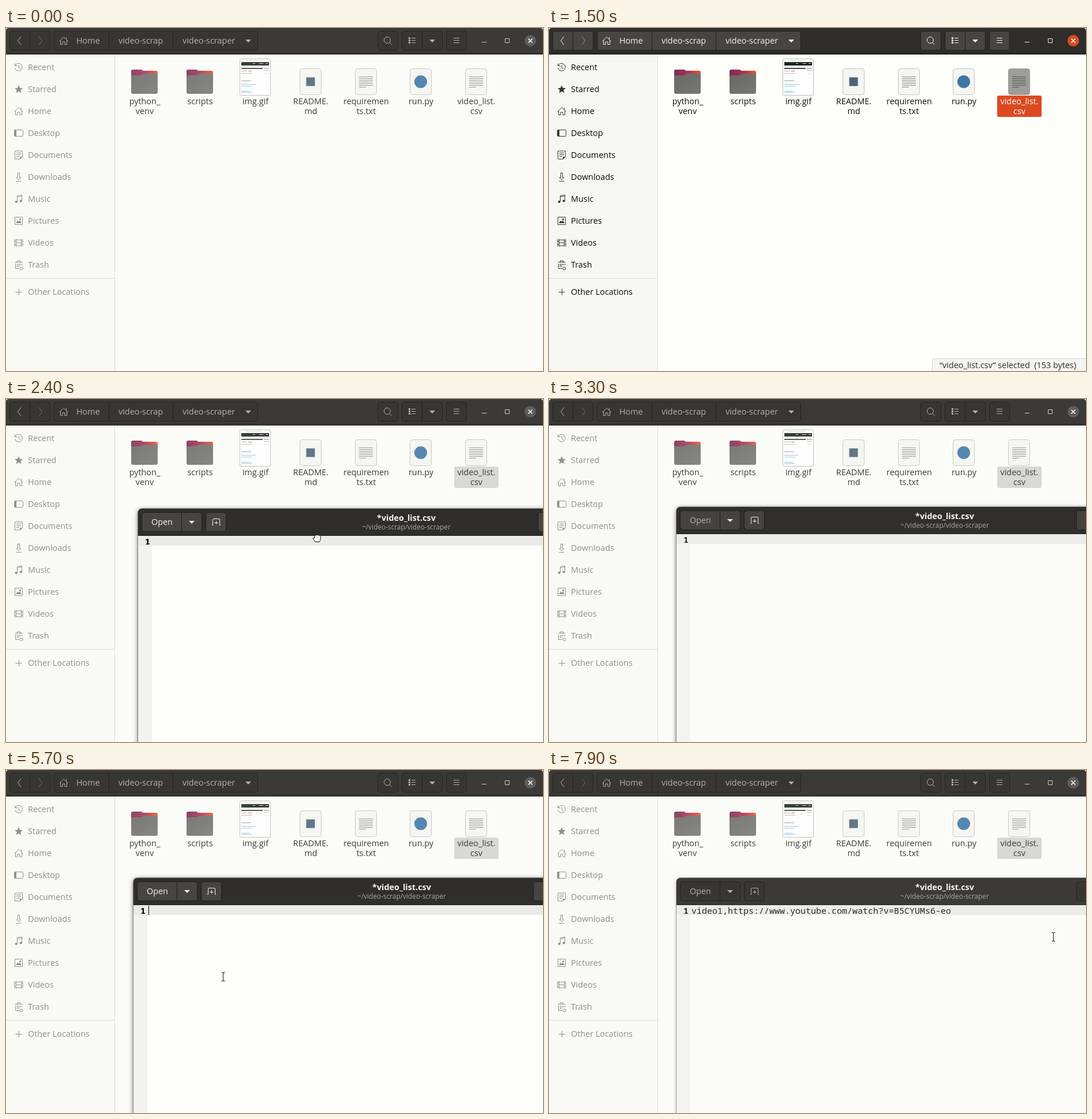
An HTML page for the animation above (8 s loop, 931 by 594 pixels).

```html
<!DOCTYPE html>
<html lang="en">
<head>
<meta charset="utf-8">
<title>Editing a video list</title>
<style>
html, body { margin: 0; width: 100%; height: 100%; overflow: hidden; background: #fbfcf8; }
svg { display: block; position: absolute; left: 0; top: 0; font: 14.4px "Open Sans", "Noto Sans", sans-serif; }

.off { --head: #3c3a37; --edge: #38302f; --btn: #383633; --rim: #252421; --fg: #b4b2ad; --ctl: #cfcdc8; --close: #5f5d59;
  --side: #f9faf5; --bg: #fbfcf8; --text: #8d8f8b; --icon: #8f918d; --label: #3a3c39; --sel: #d8d9d5; --selText: #3a3c39;
  --gutter: #f3f4ef; --line: #ebece7; --num: #2b2d2b; }
.on { --head: #2f2e2b; --edge: #292825; --btn: #464541; --rim: #1f1e1c; --fg: #f4f3ef; --ctl: #f4f3ef; --close: #dd4a22;
  --side: #f6f7f2; --bg: #fefffb; --text: #0c0d0b; --icon: #353633; --label: #0c0d0b; --sel: #dc4a21; --selText: #fff;
  --gutter: #f2f3ee; --line: #eaebe6; --num: #000; }

.btn { fill: var(--btn); stroke: var(--rim); }
.rim { stroke: var(--rim); }
.fg { fill: var(--fg); }
.ln { fill: none; stroke: var(--fg); }
.ctl { fill: none; stroke: var(--ctl); }
.ic { fill: none; stroke: var(--icon); }
.ics { fill: var(--icon); }
.side { fill: var(--text); }
.label { fill: var(--label); text-anchor: middle; }
.picked { fill: var(--selText); }
.mid { text-anchor: middle; }
.mono { font-family: "Noto Sans Mono", "DejaVu Sans Mono", monospace; font-size: 15px; }
.bold { font-weight: 700; }

.anim { animation: 8s step-end infinite; }
#files .on { animation-name: filesFocus; }
#files .off .pick { animation-name: pick; }
#status { animation-name: status; }
#editor { animation-name: drag; }
.soft { filter: drop-shadow(0 1px 3px rgba(0,0,0,.25)); }
.deep { filter: drop-shadow(0 2px 5px rgba(0,0,0,.4)); }
.head.on, #shadow { animation-name: headFocus; }
.body.on { animation-name: bodyFocus; }
#open { animation-name: openFocus; }
#caret { animation-name: caret; }
#typed { animation-name: typed; }
#arrow { animation-name: arrow; }
#hand { animation-name: hand; }
#beam { animation-name: beam; }

@keyframes filesFocus { 0% { opacity: 0 } 16.25% { opacity: .45 } 17.5% { opacity: .85 } 18.75% { opacity: 1 }
  26.25% { opacity: .45 } 27.5% { opacity: .06 } 28.75%, 100% { opacity: 0 } }
@keyframes pick { 0% { opacity: 0 } 16.25%, 100% { opacity: 1 } }
@keyframes status { 0% { opacity: 0 } 17.5% { opacity: 1 } 26.25%, 100% { opacity: 0 } }
@keyframes drag { 0% { transform: translate(1200px, 0) } 26.25% { transform: translate(424px, 241px) }
  27.5% { transform: translate(384px, 231px) } 28.75% { transform: translate(300px, 209px) }
  30% { transform: translate(229px, 190px) } 31.25%, 100% { transform: translate(221px, 187px) } }
@keyframes headFocus { 0% { opacity: 1 } 41.25% { opacity: .9 } 42.5% { opacity: .45 } 43.75% { opacity: .1 } 45% { opacity: 0 }
  66.25% { opacity: .45 } 67.5% { opacity: .9 } 68.75% { opacity: 1 }
  82.5% { opacity: .96 } 83.75% { opacity: .45 } 85% { opacity: .1 } 86.25%, 100% { opacity: 0 } }
@keyframes bodyFocus { 0% { opacity: 1 } 41.25% { opacity: 0 } 66.25% { opacity: 1 } 82.5%, 100% { opacity: 0 } }
@keyframes openFocus { 0% { fill: #f4f3ef } 41.25% { fill: #b4b2ad } 66.25% { fill: #f4f3ef } 82.5%, 100% { fill: #b4b2ad } }
@keyframes caret { 0% { opacity: 1 } 28.75% { opacity: 0 } 36.25%, 100% { opacity: 1 } }
@keyframes typed { 0% { opacity: 0 } 82.5%, 100% { opacity: 1 } }
@keyframes arrow { 0% { transform: translate(-99px, -99px) } 8.75% { transform: translate(852px, 136px) }
  10% { transform: translate(834px, 124px) } 12.5% { transform: translate(830px, 117px) }
  13.75% { transform: translate(826px, 111px) } 18.75%, 100% { transform: translate(-99px, -99px) } }
@keyframes hand { 0% { transform: translate(-99px, -99px) } 26.25% { transform: translate(739px, 269px) }
  27.5% { transform: translate(699px, 259px) } 28.75% { transform: translate(612px, 249px) }
  30% { transform: translate(539px, 241px) } 31.25% { transform: translate(532px, 218px) }
  35%, 100% { transform: translate(-99px, -99px) } }
@keyframes beam { 0% { transform: translate(-99px, -99px) } 35% { transform: translate(533px, 244px) }
  36.25% { transform: translate(534px, 251px) } 37.5% { transform: translate(534px, 254px) }
  41.25% { transform: translate(-99px, -99px) }
  63.75% { transform: translate(352px, 401px) } 65% { transform: translate(355px, 396px) }
  66.25% { transform: translate(359px, 389px) } 67.5% { transform: translate(364px, 380px) }
  68.75% { transform: translate(369px, 370px) } 70% { transform: translate(374px, 362px) }
  71.25% { transform: translate(376px, 358px) } 73.75% { transform: translate(362px, 389px) }
  76.25% { transform: translate(-99px, -99px) }
  95% { transform: translate(334px, 454px) } 96.25% { transform: translate(510px, 399px) }
  97.5% { transform: translate(740px, 324px) } 98.75%, 100% { transform: translate(874px, 289px) } }
</style>
</head>
<body>
<svg width="931" height="594" viewBox="0 0 931 594">
  <defs>
    <linearGradient id="tab"><stop offset="0" stop-color="#7d2a55"/><stop offset=".5" stop-color="#a33450"/><stop offset="1" stop-color="#e4572f"/></linearGradient>
    <linearGradient id="front" x2="1" y2="1"><stop offset="0" stop-color="#686966"/><stop offset="1" stop-color="#777875"/></linearGradient>
  </defs>
  <g id="files"></g>
  <g id="status" class="anim">
    <path d="M664.5 595V576q0-3.500 3.500-3.500H932V595z" fill="#f4f5f0" stroke="#d2d3ce"/>
    <text x="677" y="588.500" fill="#2d2e2c">“video_list.csv” selected&nbsp; (153 bytes)</text>
  </g>
  <g id="editor" class="anim"></g>
  <path id="arrow" class="anim" d="M.5.5V16L4.300 12.600 6.800 18.300 9.300 17.200 6.900 11.600H12z" fill="#111" stroke="#fff"/>
  <path id="hand" class="anim" d="M-4-3.500q.5-2.500 2.500-1.200 1-1.800 2.800-.4 1.600-1 2.600.6 2.200-.6 2.400 1.600V1Q6 4 4.500 6.500H-3Q-4 4-6.800 1.300-7.500-.6-5-.6L-4 0z" fill="#fff" stroke="#111"/>
  <g id="beam" class="anim" fill="none">
    <path d="M-3.500-8H-1Q.5-8 .5-6.500V6.500Q.5 8-1 8H-3.500M4.500-8H2Q.5-8 .5-6.500M.5 6.500Q.5 8 2 8H4.500" stroke="#fff" stroke-width="3"/>
    <path d="M-2.500-7.500H-1Q.5-7.500 .5-6V6Q.5 7.500-1 7.500H-2.500M3.500-7.500H2Q.5-7.500 .5-6M.5 6Q.5 7.500 2 7.500H3.500" stroke="#111"/>
  </g>
</svg>
<script>
const at = (x, y, inner) => `<g transform="translate(${x} ${y})">${inner}</g>`;
const rect = (x, y, w, h, attrs) => `<rect x="${x}" y="${y}" width="${w}" height="${h}" ${attrs}/>`;
const path = (cls, d) => `<path class="${cls}" d="${d}"/>`;
const text = (x, y, cls, s) => `<text x="${x}" y="${y}" class="${cls}">${s}</text>`;
const button = (x, y, w) => rect(x + .5, y + .5, w - 1, 33, 'rx="4" class="btn"');
const down = (x, y) => path('fg', `M${x - 5} ${y - 2}h10l-5 5z`);

const house = 'M-7.500 1L0-6.500 7.500 1M-5.500-1V6.500H-2V2H2V6.500H5.500V-1M4.500-6V-2.500';
// label, outlined part, filled part
const places = [
  ['Recent', 'M-6-3A6.500 6.500 0 1 1-6.500 1M-6.500-6.500V-2.500H-2.500M0-4V.5L3 2.500', ''],
  ['Starred', '', 'M0-7L2-2.200 7-1.800 3.200 1.500 4.400 6.500 0 3.800-4.400 6.500-3.200 1.500-7-1.800-2-2.200z'],
  ['Home', house, ''],
  ['Desktop', 'M-6.500-5.500H6.500Q7.500-5.500 7.500-4.500V4.500Q7.500 5.500 6.500 5.500H-6.500Q-7.500 5.500-7.500 4.500V-4.500Q-7.500-5.500-6.500-5.500z', 'M-7-5h3V5h-3z'],
  ['Documents', 'M-6.500-7H6.500V3L2.500 7H-6.500zM-4-3.500H4M-4-.5H4M-4 2.500H1', 'M2 7V3H6.500z'],
  ['Downloads', 'M-1.500-7H1.500V1H4L0 5-4 1H-1.500zM-4.500 7.500H4.500', ''],
  ['Music', 'M-2.500 4V-5.500L5.500-7V3M-2.500-3.500L5.500-5', 'M-6.500 5a2.200 2 0 1 1 4.400 0a2.200 2 0 1 1-4.400 0M1.500 3.500a2.200 2 0 1 1 4.400 0a2.200 2 0 1 1-4.400 0'],
  ['Pictures', 'M-6.500-6.500H6.500V6.500H-6.500z', 'M-5 4L-2-.5 0 1.500 2-1 5 4zM1-4h3v2.500h-3z'],
  ['Videos', 'M-7-6.500V6.500M7-6.500V6.500M-4.500-6.500V6.500M4.500-6.500V6.500M-4.500-5H4.500M-4.500 0H4.500M-4.500 5H4.500M-7-3H-4M-7 3H-4M7-3H4M7 3H4', ''],
  ['Trash', 'M-6.500-4.500H6.500M-2.500-5V-7H2.500V-5M-5.500-2V6.500H1M-2.500-2V4M0-2V4M2.500-2V1M5.500-2V1M2 6.500a2.500 2.500 0 1 1 5 0a2.500 2.500 0 1 1-5 0', ''],
  ['Other Locations', 'M-5.500.5H5.500M.5-5.500V6', '']
];

const page = (inner) => rect(-18.5, -22.5, 37, 45, 'rx="4" fill="#f5f5f2" stroke="#c2c3bf"') + inner;
const textPage = page([...Array(7)].map((_, i) =>
  rect(-12, -9 + i * 3, i == 6 ? 12 : 24, 1, 'fill="#8c8d8a"')).join(''));
const folder = '<path d="M-23 12V-18q0-3 3-3H-6q2 0 3 2H20q3 0 3 3V12z" fill="url(#tab)"/>'
  + '<path d="M-23-9q0-2 2-2H-7q2 0 4-2.500H21q2 0 2 2V18q0 3-3 3H-20q-3 0-3-3z" fill="url(#front)"/>';

function thumb() {
  const bar = (x, y, w, h, c) => rect(x, y, w, h, `fill="${c}"`);
  const links = [-2, 4, 7, 16, 18].map((y, i) => bar(-24, y, [17, 25, 19, 15, 19][i], 1, i == 0 ? '#9a9b98' : '#8cc4e4'));
  return rect(-26.5, -39.5, 53, 63, 'rx="2" fill="#fff" stroke="#b9bab6"')
    + bar(-24, -34, 48, 6, '#20241f') + bar(-4, -32, 4, 1, '#ccc') + bar(7, -32, 7, 1, '#ccc') + bar(18, -32, 4, 1, '#ccc')
    + bar(-18, -37, 31, 1, '#d5d6d2') + bar(-24, -24, 37, 2, '#444') + bar(-24, -19, 10, 1, '#aaa')
    + bar(-12, -20, 6, 3, '#ccc') + bar(15, -24, 9, 2, '#b8b9b6') + bar(15, -20, 9, 1, '#b8b9b6')
    + bar(-24, -15, 19, 1, '#e3a99c') + bar(16, -15, 7, 1, '#c5dceb') + links.join('');
}

const items = [
  [folder, 'python_', 'venv'],
  [folder, 'scripts'],
  [thumb(), 'img.gif'],
  [page('<rect x="-7.500" y="-7.500" width="15" height="15" fill="#4d6478"/>'), 'README.', 'md'],
  [textPage, 'requiremen', 'ts.txt'],
  [page('<circle r="11" fill="#3d76a8"/>'), 'run.py'],
  [textPage, 'video_list.', 'csv']
];

function fileHeader() {
  const rows = [17, 21, 25].map((y) => rect(698, y - 1, 3, 3, 'class="fg"')
    + path('ln', `M703 ${y + .5}h7M776 ${y + .5}h10`)).join('');
  return rect(0, 0, 931, 46, 'fill="var(--head)"') + rect(0, 42, 931, 4, 'fill="var(--edge)"')
    + '<path d="M0 0H5Q0 0 0 5zM931 0V5Q931 0 926 0z" fill="#f4f4f0"/>'
    + [[6, 71], [83, 354], [644, 36], [686, 71], [763, 36]].map(([x, w]) => button(x, 5, w)).join('')
    + path('rim', 'M41.500 5V39M178.500 5V39M289.500 5V39M721.500 5V39')
    + path('ln', 'M26 14.500L20.500 22 26 29.500')
    + `<g opacity=".45">${path('ln', 'M57 14.500L62.500 22 57 29.500')}</g>`
    + at(100, 22, path('ln', house))
    + text(122, 27, 'fg', 'Home') + text(195, 27, 'fg', 'video-scrap') + text(306, 27, 'fg', 'video-scraper')
    + down(420, 22) + down(739, 22) + rows
    + path('ln', 'M655.500 21a5.500 5.500 0 1 1 11 0a5.500 5.500 0 1 1-11 0M664.500 25L668.500 29')
    + path('ctl', 'M825 24.500h8M865.500 18.500h7v7h-7z')
    + '<circle cx="909" cy="22" r="10" fill="var(--close)"/>'
    + '<path d="M905.500 18.500l7 7m0-7l-7 7" stroke="#fff" stroke-width="1.500"/>';
}

function sidebar() {
  const row = ([name, line, solid], i) => {
    const y = i < 10 ? 68 + 38 * i : 457;
    return at(22, y, path('ic', line) + path('ics', solid)) + text(38, y + 5, 'side', name);
  };
  return rect(0, 46, 188, 548, 'fill="var(--side)"')
    + '<path d="M188.500 46V594M0 433.500H188" stroke="#dcddd8"/>' + places.map(row).join('');
}

function grid(state) {
  return items.map(([art, a, b], i) => {
    const x = 240 + Math.round(i * 95.89), last = i == 6, cls = last ? 'label picked' : 'label';
    const mark = last ? `<g class="pick anim">${rect(777, 117, 77, 37, 'rx="3" fill="var(--sel)"')}</g>` : '';
    const dark = last && state == 'on' ? rect(-18.5, -22.5, 37, 45, 'rx="4" opacity=".36"') : '';
    return at(x, 93, `<g opacity="${state == 'on' ? 1 : .88}">${art}</g>` + dark) + mark
      + text(x + .5, 132, cls, a) + (b ? text(x + .5, 149, cls, b) : '');
  }).join('');
}

const filesLayer = (state) => `<g class="${state} anim">`
  + rect(0, 0, 931, 594, 'fill="var(--bg)"') + sidebar() + grid(state) + fileHeader() + '</g>';

const bodyLayer = (state) => `<g class="body ${state} anim">`
  + rect(0, 47, 900, 700, 'fill="var(--bg)"') + rect(0, 47, 24, 700, 'fill="var(--gutter)"')
  + rect(0, 47, 900, 17, 'fill="var(--line)"')
  + '<text x="16.500" y="62" class="mono bold mid" fill="var(--num)">1</text>'
  + (state == 'on' ? '<g id="caret" class="anim"><path d="M26.500 48V64" stroke="#000"/></g>' : '') + '</g>';

const headLayer = (state) => `<g class="head ${state} anim">`
  + '<path d="M0 47V8Q0 0 8 0H900V47z" fill="var(--head)"/><path d="M0 46.500H900" class="rim"/>'
  + button(6, 6, 105) + button(117, 6, 36) + button(693, 6, 70) + path('rim', 'M75.500 6V40') + down(93, 23)
  + path('ln', 'M128 28.500h1.500V19q0-1.500 1.500-1.500h9q1.500 0 1.500 1.500v9.500h1.500M135.500 21v6M132.500 24.500h6')
  + '<text x="465" y="21" class="bold mid" fill="#f6f5f1">*video_list.csv</text>'
  + '<text x="465" y="36" class="mid" font-size="11.800" fill="#aaa8a3">~/video-scrap/video-scraper</text></g>';

const frame = (cls) => `<path class="${cls}" d="M0 700V8Q0 0 8 0H900V700z" fill="#3c3a37"/>`;

document.getElementById('files').innerHTML = filesLayer('off') + filesLayer('on');
document.getElementById('editor').innerHTML = frame('soft')
  + `<g id="shadow" class="anim">${frame('deep')}</g>`
  + '<path d="M-.5 700V8Q-.5-.5 8-.5H900" fill="none" stroke="#000" stroke-opacity=".3"/>'
  + bodyLayer('off') + bodyLayer('on') + headLayer('off') + headLayer('on')
  + '<text id="open" class="anim" x="23" y="28">Open</text>'
  + '<text id="typed" class="mono anim" x="26" y="62" fill="#2b2d2b">video1,https://www.youtube.com/watch?v=B5CYUMs6-eo</text>';
</script>
</body>
</html>
```
